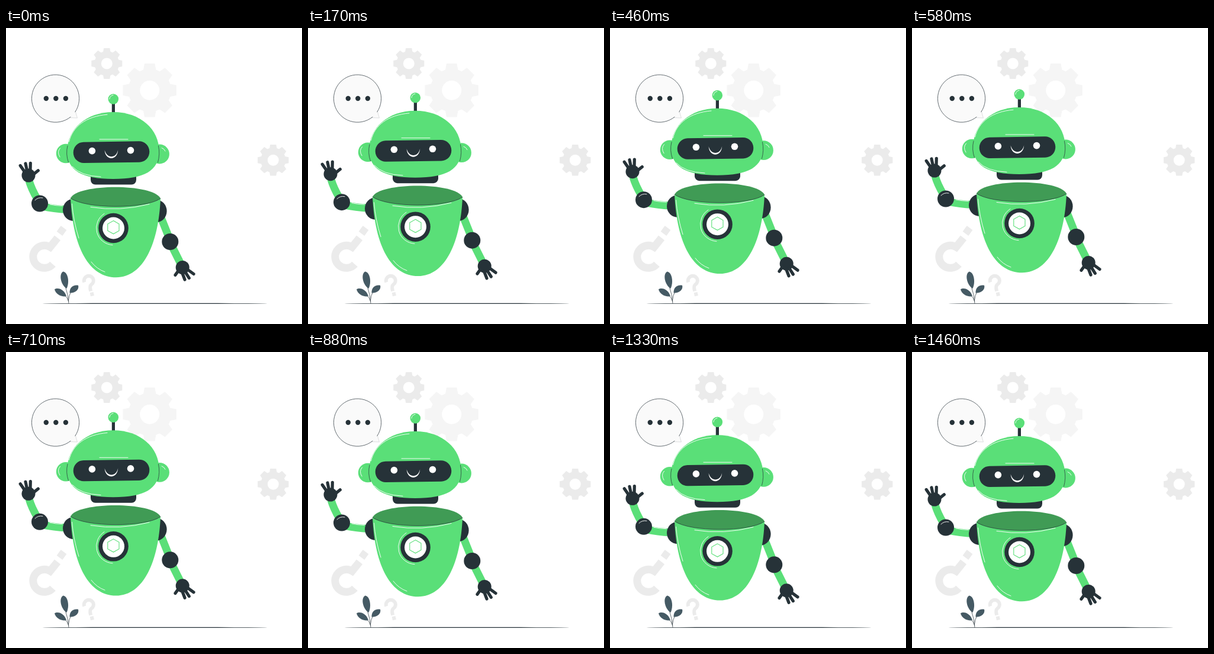
Recreate the animation shown at these times as an HTML page. Size 500 by 500 pixels, loop 1500 ms.

```html
<!DOCTYPE html>
<html lang="en">
<head>
<meta charset="utf-8">
<title>Waving robot</title>
<style>
  html, body { margin: 0; width: 100%; height: 100%; overflow: hidden; background: #fff; }
  svg { display: block; width: 100%; height: 100%; }
  .green { fill: #5adf78; }
  .dark { fill: #263238; }
  .white { fill: #fff; }
  .leaf { fill: #455a64; }
  .limb { fill: none; stroke: #5adf78; stroke-width: 13; }
  .finger { fill: none; stroke: #263238; stroke-width: 5.2; stroke-linecap: round; }
  .shine { fill: none; stroke: #fff; stroke-width: .9; stroke-linecap: round; }
  .hair { fill: none; stroke: #263238; stroke-width: .7; stroke-linecap: round; }
  .mark { fill: none; stroke: #ebebeb; }
</style>
</head>
<body>
<svg viewBox="0 0 500 500" xmlns="http://www.w3.org/2000/svg">
  <g id="gears"></g>

  <g id="questions">
    <path class="mark" stroke-width="13" d="M79 399A19 19 0 1 1 74.5 370L87 354.5"/>
    <rect x="88" y="336.5" width="12" height="12" fill="#ebebeb" transform="rotate(36 94 342.5)"/>
    <path class="mark" stroke-width="6" d="M132.3 429.5A8 8 0 1 1 144 433.5C141.5 435.5 141.5 438.5 143.2 444.5"/>
    <rect x="142.3" y="446.6" width="6" height="6" fill="#ebebeb" transform="rotate(-12 145.3 449.6)"/>
  </g>

  <g id="ground">
    <ellipse class="dark" cx="251.5" cy="465.4" rx="190" ry=".65"/>
    <path class="hair" d="M106 465Q105 450 100 436M105.8 462Q104 456 100 452M105.5 460Q106 452 110 445"/>
    <path class="leaf" d="M102.5 440C92 434 89 415 96.5 411.5C104 412 108 428 102.5 440Z"/>
    <path class="leaf" d="M102 453.3C92 454.5 84 449 82 441.5C88 437.5 99 442 102 453.3Z"/>
    <path class="leaf" d="M107.5 447.5C107 438 114 433 122 434.8C124 442 117 448 107.5 447.5Z"/>
  </g>

  <g id="bubble">
    <path d="M107 151.5L120.5 152L116.5 138Z" fill="#fafafa" stroke="#c9cccd" stroke-width=".6"/>
    <circle cx="83.5" cy="119.3" r="40.2" fill="#fafafa"/>
    <path class="hair" d="M109 150.3A40.2 40.2 0 1 1 116.8 141.8"/>
    <g class="dark">
      <circle cx="67.8" cy="119" r="4.2"/>
      <circle cx="84.3" cy="119" r="4.2"/>
      <circle cx="100.9" cy="119" r="4.2"/>
    </g>
  </g>

  <g id="robot">
    <g id="leftArm">
      <path class="limb" stroke-width="14" d="M62 301.5Q80 305.5 103 306.5"/>
      <path class="limb" d="M39 258Q43 272 53 289"/>
      <circle class="dark" cx="57" cy="296.5" r="14"/>
      <circle class="dark" cx="38" cy="249" r="11.5"/>
      <path class="finger" d="M31.5 243L24.2 232.5M35.5 241L33 229M41 241L41.3 228.3M46 247.5L54.3 240.8"/>
      <ellipse class="dark" cx="114" cy="307.3" rx="18" ry="18.7"/>
      <path class="shine" d="M49 291Q54 285.5 62 287M49 264Q51 271 55 277M74 298Q84 300.2 95 300.5"/>
    </g>
    <g id="rightArm">
      <path class="limb" d="M261 318L275 353"/>
      <path class="limb" stroke-width="12" d="M280 368L296 400"/>
      <ellipse class="dark" cx="254" cy="309.3" rx="17.6" ry="19"/>
      <circle class="dark" cx="277.3" cy="361" r="14"/>
      <circle class="dark" cx="298.2" cy="404.5" r="11.5"/>
      <path class="finger" d="M291.5 409.5L286 417.3M297 412L302 425M302 411L309.3 422.3M306 407.5L317 415.5"/>
    </g>

    <g id="body">
      <path class="green" d="M109 287.5C113 372 141 421.3 186 421.3C233 421.3 258 362 261 288C240 303 130 303 109 287.5Z"/>
      <path fill="#409b55" d="M109 287.5C121 262.5 249 262.5 261 288C236 306 134 306 109 287.5Z"/>
      <path class="hair" d="M109 287.5C134 306 236 306 261 288"/>
      <path class="shine" d="M143 302.5Q192 310.5 242 297.5M111.5 297Q114 327 123 355M144 395Q153 407 167 412"/>
      <path class="shine" d="M166 313.5A28.8 28.8 0 0 0 180 366.6"/>
      <circle class="dark" cx="181.5" cy="338" r="25.3"/>
      <circle class="white" cx="181.5" cy="338" r="18.5"/>
      <path d="M181.5 325.6L191 331V342.5L181.5 347.8L171.8 342.5V331Z" fill="none" stroke="#5adf78" stroke-width="1.1"/>
    </g>

    <g id="head">
      <rect class="dark" x="143" y="242" width="77" height="22.5" rx="8"/>
      <rect class="dark" x="178.8" y="125" width="5.2" height="22"/>
      <circle class="green" cx="181.3" cy="120" r="8.8"/>
      <path class="shine" d="M174.8 120Q175.3 114.5 181 113.3"/>
      <circle class="green" cx="101" cy="212" r="16.2"/>
      <circle class="green" cx="259.5" cy="213" r="16.4"/>
      <path class="green" d="M181 142C227 142 258.5 171 258.7 208C258.5 241 234 255 181 255C128 255 103.5 241 103.3 208C103.5 171 135 142 181 142Z"/>
      <path class="hair" d="M104 199Q100.5 213 105.5 227M257.5 199Q260.5 213 256.5 227"/>
      <path class="shine" d="M106.5 192C112 167 135 149 171 146.2M112 234Q126 250 160 251.3M158 188H206M91 218Q85.5 209 91.5 203M263 202.5Q267.5 204 269 208"/>
      <rect class="dark" x="113.7" y="192" width="128.6" height="35.4" rx="17.5" transform="rotate(-.8 178 209.7)"/>
      <circle class="white" cx="145.4" cy="207.6" r="5.8"/>
      <circle class="white" cx="210.5" cy="206.6" r="5.8"/>
      <path class="white" d="M166.6 206.3C167.5 224.5 188.5 224.5 189.2 206C186 221 170.5 221 166.6 206.3Z"/>
    </g>
  </g>
</svg>
<script>
  const LOOP = 1500, FPS = 24, LAST = 35, LIFT = 10;
  const robot = document.getElementById('robot');

  // Eight tapered teeth around a round hole.
  function gear(cx, cy, r, hole, color) {
    const pts = [];
    for (let i = 0; i < 8; i++) {
      for (const [turn, k] of [[-.3, .79], [-.19, 1], [.19, 1], [.3, .79]]) {
        const a = i * Math.PI / 4 + turn;
        pts.push((cx + r * k * Math.cos(a)).toFixed(1) + ' ' + (cy + r * k * Math.sin(a)).toFixed(1));
      }
    }
    const ring = `M${cx - hole} ${cy}a${hole} ${hole} 0 1 0 ${2 * hole} 0a${hole} ${hole} 0 1 0 ${-2 * hole} 0Z`;
    return `<path d="M${pts.join('L')}Z${ring}" fill="${color}" fill-rule="evenodd"/>`;
  }

  document.getElementById('gears').innerHTML =
    gear(170.3, 60, 26.5, 9.5, '#ebebeb') +
    gear(242.7, 105.3, 46, 16.5, '#f5f5f5') +
    gear(451.3, 223.2, 26.7, 9.5, '#ebebeb');

  // Steady rise and fall, stepped at 24 pictures a second.
  function draw(ms) {
    const step = Math.min(LAST, Math.floor((ms % LOOP + 4) * FPS / 1000));
    const rise = 1 - Math.abs(2 * step / LAST - 1);
    robot.setAttribute('transform', `translate(0 ${(-LIFT * rise).toFixed(3)})`);
  }

  let start;
  function tick(now) {
    if (start === undefined) start = now;
    draw(now - start);
    requestAnimationFrame(tick);
  }
  draw(0);
  requestAnimationFrame(tick);
</script>
</body>
</html>
```
